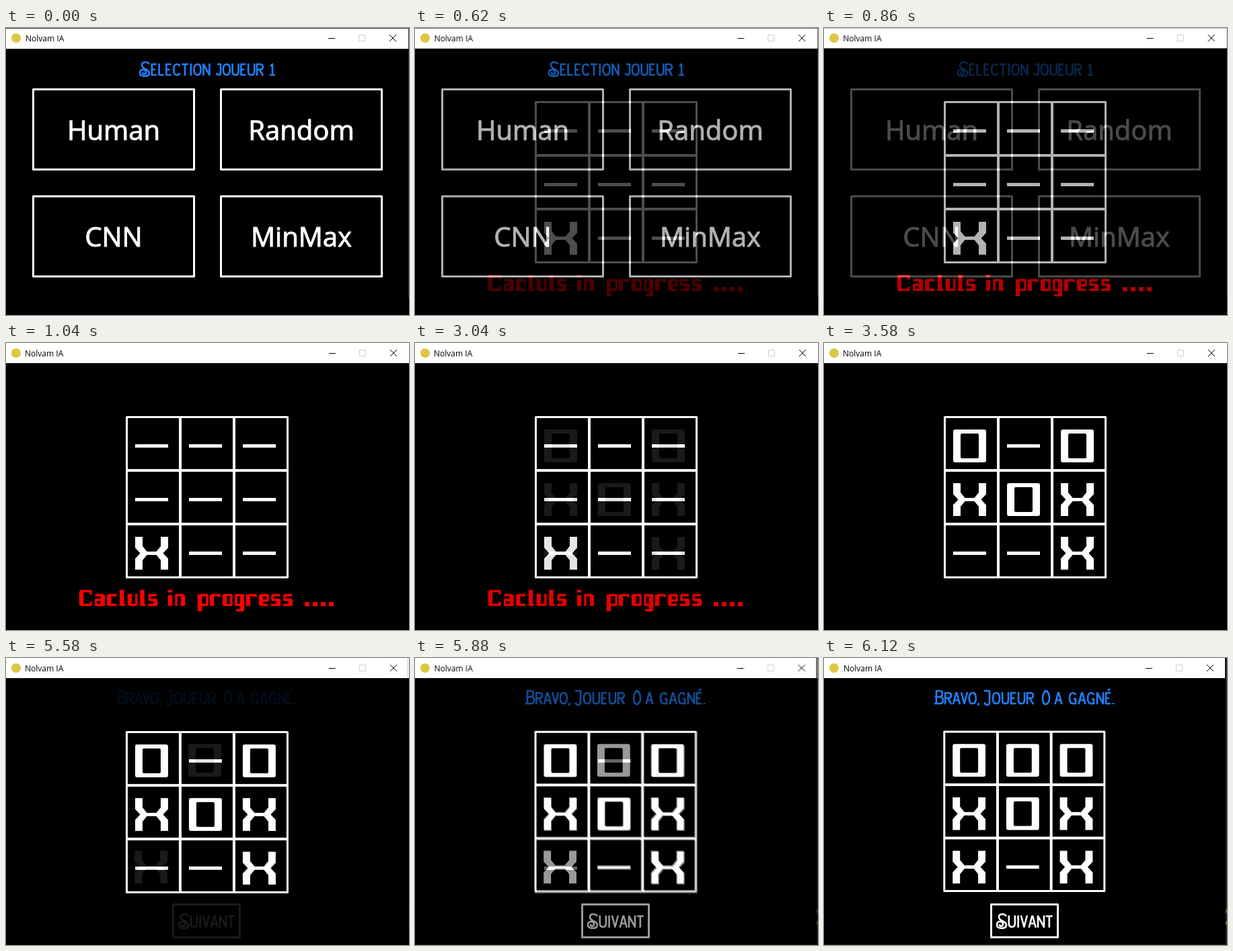
An HTML page with a canvas for the animation above (8 s loop, 599x428 px).

```html
<!DOCTYPE html>
<html lang="fr">
<head>
<meta charset="utf-8">
<title>Nolvam IA</title>
<style>
html, body { margin: 0; width: 599px; height: 428px; overflow: hidden; background: #000; }
canvas { display: block; }
</style>
</head>
<body>
<canvas id="stage" width="599" height="428" role="img" aria-label="Nolvam IA: Selection joueur 1, Cacluls in progress ...., Bravo, Joueur O a gagné."></canvas>
<script>
const W = 599, H = 428, LOOP = 8000, STEP = 60;
const BLUE = '#2080ff', RED = '#ff0000', WHITE = '#fff';

// Ornamental small caps: [width, strokes]; capitals are the taller forms.
const DECO = {
  S: [16, 'M15 1Q13 -2 9 -2Q4 -2 4 2Q4 6 9 8Q15 11 15 14Q15 19 8 19Q1 19 1 14Q1 9 5.5 9Q10 9 10 13Q10 16 7 16Q5 16 5 13'],
  B: [14, 'M3 18V-2H8Q12 -2 12 2T8 7H1M8 7Q13 7 13 12T8 17H0'],
  J: [11, 'M1 -2H9V14Q9 19 5 19Q2 19 2 15'],
  O: [15, 'M5 -2H9Q13 2 13 9T8 18Q3 18 3 9T9 -2'],
  a: [11, 'M.5 18L5 1H6L10.5 18M2 12H9'],
  c: [11, 'M10 4Q9 1 6 1Q1 1 1 9T6 17Q9 17 10 14'],
  e: [9, 'M8 1H1V17H8M1 9H6'],
  é: [9, 'M8 1H1V17H8M1 9H6M4 -2L7 -5'],
  g: [12, 'M10 4Q9 1 6 1Q1 1 1 9T6 17H10V10H7'],
  i: [4, 'M2 0V18'],
  j: [8, 'M2 1H7V13Q7 17 4 17Q1 17 1 14'],
  l: [9, 'M1 0V17H8'],
  n: [11, 'M1 18V1L10 17V0'],
  o: [12, 'M6 1Q11 1 11 9T6 17Q1 17 1 9T6 1'],
  r: [11, 'M1 18V1H5Q10 1 10 5T5 9H1M5 9L10 18'],
  t: [10, 'M0 1H10M5 1V18'],
  u: [11, 'M1 0V12Q1 17 5.5 17T10 12V0'],
  v: [10, 'M.5 0L5 17L9.5 0'],
  1: [8, 'M1 4L4 1V17M0 17H8'],
  ',': [3, 'M2 16L1 20'],
  '.': [3, 'M1 16V18']
};

// Square techno letters: [width, thin strokes, thick strokes].
const TECHNO = {
  C: [21, 'M18 1V-4H3V16.5H18V12', 'M4 -3V16'],
  a: [17, 'M2 2H13V16.5H3V9H13', 'M13 2V18'],
  c: [17, 'M15 2H3V16.5H15', 'M4 2V17'],
  l: [10, 'M3 16.5H9', 'M4 -6V18'],
  u: [17, 'M3 16.5H14V0', 'M4 0V17'],
  s: [16, 'M14 2H3V9H13V16.5H1', 'M12 9V17'],
  i: [7, '', 'M3 2V18M3 -6V-2'],
  n: [17, 'M3 18V2H14', 'M13 2V18'],
  p: [16, 'M3 2H14V16.5H3', 'M3 1V26'],
  r: [16, 'M14 5V2H3', 'M3 1V18'],
  o: [16, 'M3 2H14V16.5H3Z', 'M4 2V17'],
  g: [16, 'M13 2H3V16.5H13M14 24.5H3', 'M12 1V26'],
  e: [16, 'M3 2H14V10H3M3 16.5H14', 'M4 2V17'],
  '.': [10, '', 'M0 15.5H7']
};

function write(g, font, text, x, y, color, thin, thick, gap = 2) {
  g.strokeStyle = color;
  g.lineJoin = 'round';
  for (const ch of text) {
    const [w, ...layers] = font[ch];
    g.save();
    g.translate(x, y);
    layers.forEach((d, i) => {
      g.lineWidth = i ? thick : thin;
      g.stroke(new Path2D(d));
    });
    g.restore();
    x += w + gap;
  }
}

const deco = (g, text, x, y, color, gap) => write(g, DECO, text, x, y, color, 2.6, 0, gap);
const techno = (g, text, x, gap) => write(g, TECHNO, text, x, 374, RED, 3.4, 6.4, gap);

function frame(g, x, y, w, h) {
  g.strokeStyle = WHITE;
  g.lineWidth = 3;
  g.lineJoin = 'round';
  g.strokeRect(x, y, w, h);
}

function line(g, d, color) {
  g.strokeStyle = color;
  g.lineWidth = 1;
  g.stroke(new Path2D(d));
}

function titleBar(g, right, bottom, textX, x) {
  g.fillStyle = WHITE;
  g.fillRect(0, 0, right, bottom);
  g.fillStyle = '#dfc640';
  g.beginPath();
  g.arc(15, 15, 7, 0, 7);
  g.fill();
  g.fillStyle = '#000';
  g.font = '12px "Open Sans", sans-serif';
  g.textAlign = 'left';
  g.fillText('Nolvam IA', textX, 20);
  line(g, `M${x} 15.5h10`, '#000');
  line(g, `M${x + 45.5} 10.5h9v9h-9z`, '#ccc');
  line(g, `M${x + 91} 10l10 10m0 -10l-10 10`, '#000');
}

function mark(g, kind, x, y) {
  g.save();
  g.translate(x, y);
  g.fillStyle = WHITE;
  g.beginPath();
  if (kind === '-') g.rect(0, 22, 49, 5);
  if (kind === 'O') {
    g.roundRect(0, 0, 49, 49, 3);
    g.roundRect(11, 6, 27, 37, 2);
  }
  if (kind === 'X') {
    // one quarter, mirrored four ways around the centre
    g.translate(24.5, 24.5);
    const quarter = new Path2D('M0 0H17L24.5 -8V-24.5H13.5V-10.5L7 -2.5H0Z');
    for (const sx of [-1, 1]) for (const sy of [-1, 1]) {
      g.save();
      g.scale(sx, sy);
      g.fill(quarter);
      g.restore();
    }
    g.fillRect(-17, -1, 34, 2);
    g.fillRect(-1, -2.5, 2, 5);
  }
  g.fill('evenodd');
  g.restore();
}

function board(g, marks) {
  [...marks].forEach((kind, i) => {
    const x = 80 * (i % 3), y = 80 * Math.floor(i / 3);
    frame(g, 179.5 + x, 110.5 + y, 79, 79);
    mark(g, kind, 192 + x, 129 + y);
  });
}

function scene(draw) {
  const c = document.createElement('canvas');
  c.width = W;
  c.height = H;
  const g = c.getContext('2d');
  g.fillStyle = '#000';
  g.fillRect(0, 0, W, H);
  draw(g);
  return c;
}

const menu = scene(g => {
  titleBar(g, 598, 31, 29, 479);
  g.fillStyle = '#303030';
  g.fillRect(0, 0, W, 1);
  g.fillRect(598, 0, 1, 402);
  deco(g, 'Selection', 198, 53, BLUE, 1.8);
  deco(g, 'joueur', 312, 53, BLUE, 1.8);
  deco(g, '1', 392, 53, BLUE);
  ['Human', 'Random', 'CNN', 'MinMax'].forEach((label, i) => {
    const x = 40.5 + 279 * (i % 2), y = 91.5 + 159.5 * (i >> 1);
    frame(g, x, y, 239, 119.5);
    g.font = '40px "Open Sans", sans-serif';
    g.textAlign = 'center';
    g.fillStyle = WHITE;
    g.lineWidth = 1;
    g.fillText(label, x + 119.5, y + 75);
    g.strokeText(label, x + 119.5, y + 75);
  });
});

const thinking = scene(g => {
  titleBar(g, W, 30, 28, 480);
  board(g, '------X--');
  techno(g, 'Cacluls', 108, 1.7);
  techno(g, 'in', 241);
  techno(g, 'progress', 285);
  techno(g, '....', 444);
});

const playing = scene(g => {
  titleBar(g, W, 30, 28, 480);
  board(g, 'O-OXOX--X');
});

const won = scene(g => {
  titleBar(g, 596, 30, 29, 478);
  g.fillStyle = '#262626';
  g.fillRect(597, 0, 2, H);
  g.fillRect(0, 427, W, 1);
  g.fillStyle = '#77703c';
  g.fillRect(597, 375, 2, 5);
  g.fillRect(597, 392, 2, 6);
  g.save();
  g.scale(0.996, 0.9945);
  board(g, 'OOOXOXX-X');
  g.restore();
  deco(g, 'Bravo,', 164, 51, BLUE, 1.2);
  deco(g, 'Joueur', 237, 51, BLUE);
  deco(g, 'O', 322, 51, BLUE);
  deco(g, 'a', 343, 51, BLUE);
  deco(g, 'gagné.', 364, 51, BLUE);
  frame(g, 248.5, 367.5, 99, 49);
  deco(g, 'Suivant', 256, 384, WHITE, 1.8);
});

const scenes = [menu, thinking, playing, won];
const fades = [500, 3040, 5580];
const ctx = document.getElementById('stage').getContext('2d');
let start;

function render(now) {
  start ??= now;
  const t = (now - start) % LOOP;
  ctx.globalAlpha = 1;
  ctx.drawImage(menu, 0, 0);
  fades.forEach((at, i) => {
    if (t < at) return;
    ctx.globalAlpha = Math.min(1, (Math.floor((t - at) / STEP) + 1) / 10);
    ctx.drawImage(scenes[i + 1], 0, 0);
  });
  requestAnimationFrame(render);
}
requestAnimationFrame(render);
</script>
</body>
</html>
```
